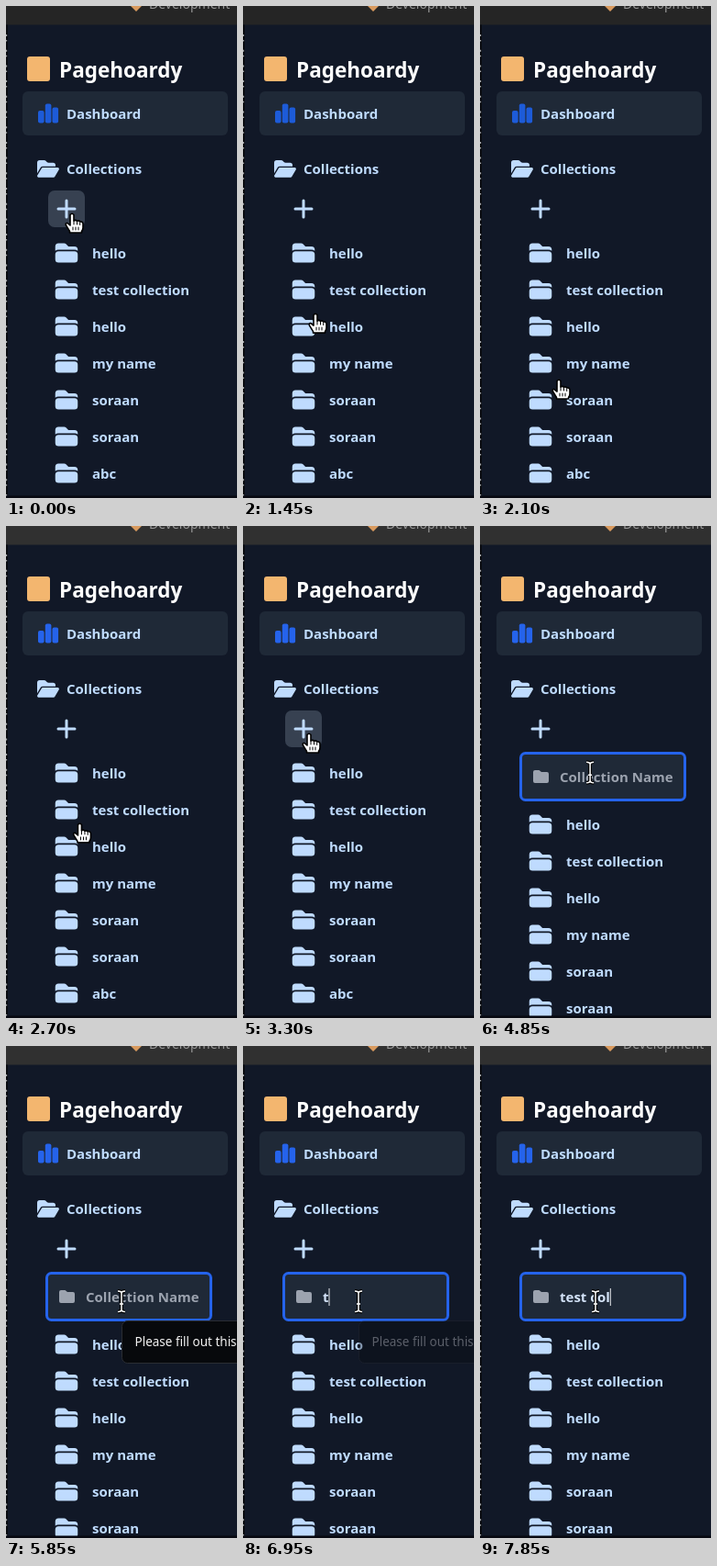
These frames come from a looping animation (252x536 px, 8000 ms). An HTML page:

```html
<!DOCTYPE html>
<html lang="en">
<head>
<meta charset="utf-8">
<title>Create a collection</title>
<style>
  html, body { margin: 0; width: 100%; height: 100%; overflow: hidden; background: #111827; }
  svg { display: block; width: 252px; height: 536px; }
  text { font: 600 15px "Noto Sans", "Open Sans", sans-serif; fill: #bfdbfe; white-space: pre; }
  #title { font-size: 22.5px; fill: #fff; }
  #tab { font-size: 14px; font-weight: 400; fill: #969696; }
  #menu text { font-size: 13.3px; }
  #tip text { font-size: 13.5px; font-weight: 400; fill: #f3f3f3; }
</style>
</head>
<body>
<svg viewBox="0 0 252 536">
  <defs>
    <path id="folder" d="M19.5 21a3 3 0 0 0 3-3v-4.5a3 3 0 0 0-3-3h-15a3 3 0 0 0-3 3V18a3 3 0 0 0 3 3zM1.5 10.15V6a3 3 0 0 1 3-3h5.4a2.25 2.25 0 0 1 1.6.66l2.1 2.12c.14.14.33.22.53.22h5.37a3 3 0 0 1 3 3v1.15A4.5 4.5 0 0 0 19.5 9h-15a4.5 4.5 0 0 0-3 1.15z"/>
  </defs>

  <rect width="252" height="536" fill="#111827"/>
  <rect id="bar" width="252" height="20.5"/>
  <path d="M133 -3L142 6L151 -3L142 -12Z" fill="#d99a5e"/>
  <text id="tab" x="156" y="3">Development</text>
  <rect y="20.5" width="2" height="516" fill="#090b10"/>
  <path d="M.6 31V536" stroke="#aeb1b5" stroke-width="1.1" stroke-dasharray="2 4 1.5 9.2"/>

  <rect x="23" y="55" width="25" height="27" rx="3" fill="#f3b66f"/>
  <text id="title" x="58" y="78">Pagehoardy</text>

  <rect x="18" y="93" width="224" height="48" rx="6" fill="#1f2937"/>
  <g id="chart">
    <rect x="35" y="114" width="6.6" height="13.5" rx="2"/>
    <rect x="42.8" y="106.5" width="6.6" height="21" rx="2"/>
    <rect x="50.5" y="110.5" width="6.6" height="17" rx="2"/>
  </g>
  <text x="66" y="122.5">Dashboard</text>

  <path transform="translate(34 168)" fill="#bfdbfe" d="M3.7 8L0 14.3V2.7A2.7 2.7 0 0 1 2.7 0h4.9q1.1 0 1.9.8l1.1 1.1q.8.8 1.9.8h4.8A2.7 2.7 0 0 1 20 5.4v1.3H6Q4.500 6.700 3.700 8zM4.900 8.700Q5.300 8 6 8h16.700q1.600.3 1.200 2l-4.700 8q-.400.700-1.200.700H1.300q-1.600-.3-1.200-2z"/>
  <text x="66" y="182.500">Collections</text>

  <rect id="hover" x="46" y="201" width="40" height="40" rx="7" fill="#374151"/>
  <path d="M66 212v18M57 221h18" stroke="#bfdbfe" stroke-width="3" stroke-linecap="round"/>

  <g id="rows"></g>

  <g id="form">
    <rect x="44.500" y="247.500" width="179" height="51" rx="5" fill="#1f2937" stroke="#2563eb" stroke-width="3"/>
    <path d="M60 266h4.500l2.500 2h6q2 0 2 2v8q0 2-2 2H60q-2 0-2-2v-10q0-2 2-2z" fill="#9ca3af"/>
    <text id="entry" x="87" y="278.500"></text>
    <rect id="caret" y="264" width="1" height="19" fill="#e5e7eb"/>
  </g>

  <g id="menu">
    <rect x="46.500" y="241.500" width="175" height="42" rx="6" fill="#1f2937" stroke="#2d3748"/>
    <rect id="choice" x="47" y="242" width="174" height="37" fill="#3f83f8"/>
    <text id="choiceText" x="67" y="265">Create Collection</text>
  </g>

  <g id="tip">
    <rect x="126.500" y="299.500" width="186" height="46" rx="6" fill="#07090c" stroke="#2a2d33"/>
    <text x="140.500" y="327">Please fill out this field.</text>
  </g>

  <rect y="533.500" width="252" height="2.500" fill="#070810"/>

  <g id="hand" stroke-linejoin="round" stroke-linecap="round">
    <path d="M-2 1.500Q0-1 2 1.500V8q2-1.500 3.500.3 2-1 3.200.7 2.800-.6 3.300 2v4.500q0 2-1.500 4V21H-2.500V19.500L-6.500 13q-1-2.800 1.500-2.500l3 2.500z" fill="#fff" stroke="#000" stroke-width="1.600"/>
    <path d="M2 8v4M5.500 9v3M8.700 10v2.500M1 15v3M4 15v3M7 15v3" fill="none" stroke="#000"/>
  </g>
  <g id="beam" fill="none">
    <path id="beamShape" d="M-4-11q4 0 4 2.500V9q0 2.500-4 2.500M4-11q-4 0-4 2.500V9q0 2.500 4 2.500M-2 3h4" stroke="#000" stroke-width="3.600"/>
    <use href="#beamShape" style="stroke:#fff"/>
    <path d="M-4-11q4 0 4 2.500V9q0 2.500-4 2.500M4-11q-4 0-4 2.500V9q0 2.500 4 2.500M-2 3h4" stroke="#fff" stroke-width="1.500"/>
  </g>
</svg>
<script>
const LOOP = 8000;
const $ = id => document.getElementById(id);
const set = (id, name, value) => $(id).setAttribute(name, value);
const show = (id, opacity) => set(id, "opacity", Number(opacity));

const names = ["hello", "test collection", "hello", "my name", "soraan", "soraan", "abc"];
$("rows").innerHTML = names.map((name, i) => `<g transform="translate(0 ${269 + 40 * i})">
  <use href="#folder" transform="translate(52 -14) scale(1.1667)" fill="#bfdbfe"/>
  <text x="94" y="5.5">${name}</text></g>`).join("");

// Each key is a time in ms followed by its values.
const pointerKeys = [
  [0, 72, 226], [1300, 72, 226], [1450, 79, 335], [2100, 86, 407], [2300, 87, 411],
  [2550, 87, 411], [2850, 74, 238], [3000, 74, 235], [3300, 72, 226], [3600, 72, 226],
  [4100, 118, 264], [4300, 118, 264], [4500, 120, 268], [4850, 120, 268],
  [4900, 125, 277], [5100, 126, 278]
];
const typed = "test col";
const keyTimes = [6900, 7150, 7200, 7250, 7300, 7450, 7600, 7800];

function pointerAt(t) {
  const next = pointerKeys.findIndex(key => key[0] > t);
  if (next < 0) return pointerKeys.at(-1).slice(1);
  const [a, b] = [pointerKeys[next - 1], pointerKeys[next]];
  const k = (t - a[0]) / (b[0] - a[0]);
  return [a[1] + (b[1] - a[1]) * k, a[2] + (b[2] - a[2]) * k];
}

const ramp = (t, start, length) => Math.min(1, Math.max(0, (t - start) / length));

function render(t) {
  const [x, y] = pointerAt(t);
  const formOpen = t >= 4300;
  const overPlus = x >= 46 && x <= 86 && y >= 201 && y <= 241;
  const overMenu = y >= 243;
  const editing = t >= 4400;

  set("bar", "fill", t < 2550 ? "#252525" : "#303030");
  set("chart", "fill", t < 2550 ? "#1d5bd8" : "#2563eb");
  show("hover", overPlus);
  set("rows", "transform", `translate(0 ${formOpen ? 56 : 0})`);

  show("menu", ramp(t, 3600, 100) - ramp(t, 4300, 100));
  show("choice", overMenu);
  $("choiceText").style.fill = overMenu ? "#1f2937" : "#bfdbfe";

  const count = keyTimes.filter(time => t >= time).length;
  const entry = $("entry");
  entry.textContent = count ? typed.slice(0, count) : "Collection Name";
  entry.style.fill = count ? "#d3e2f7" : "#9ca3af";
  show("form", formOpen);
  show("caret", count > 0);
  set("caret", "x", 87 + entry.getComputedTextLength());
  show("tip", t < 5850 ? 0 : 1 - ramp(t, 6850, 150));

  const place = `translate(${x} ${y})`;
  set("hand", "transform", place);
  set("beam", "transform", place);
  show("hand", !editing);
  show("beam", editing);
}

const start = performance.now();
function frame() {
  render((performance.now() - start) % LOOP);
  requestAnimationFrame(frame);
}
render(0);
requestAnimationFrame(frame);
</script>
</body>
</html>
```
